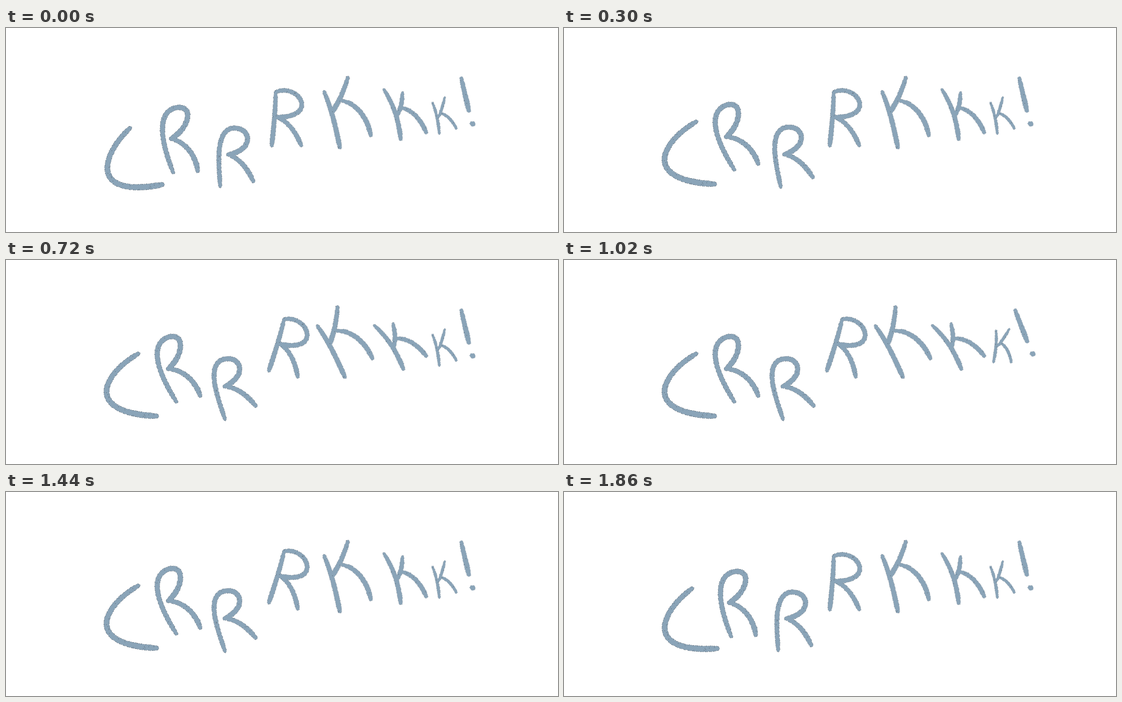
An HTML page with a canvas for the animation above (1.92 s loop, 1232 px wide and 455 px high).

```html
<!DOCTYPE html>
<html lang="en">
<head>
<meta charset="utf-8">
<title>Crrrkkk!</title>
<style>
html, body { margin: 0; width: 100%; height: 100%; overflow: hidden; background: #fff; }
canvas { display: block; }
</style>
</head>
<body>
<canvas id="stage" width="1232" height="455"></canvas>
<script>
const ctx = document.getElementById('stage').getContext('2d');
const INK = '#8aa4b8', EDGE = '#53606c';
const STEP = 60, STEPS = 32;
const letters = [];

let seed = 7;
const rand = () => {
  seed = (seed * 16807) % 2147483647;
  return seed / 2147483647;
};
const jitter = a => (rand() * 2 - 1) * a;

// Evenly spaced points along a centre line.
function sample(d) {
  const line = document.createElementNS('http://www.w3.org/2000/svg', 'path');
  line.setAttribute('d', d);
  const length = line.getTotalLength(), count = Math.ceil(length / 1.5);
  return Array.from({ length: count + 1 }, (_, i) => line.getPointAtLength(length * i / count));
}

// Rough brush outline: grows along the stroke, thins at both ends.
function brush(d, radius) {
  const pts = sample(d), last = pts.length - 1;
  const left = [], right = [], caps = [];
  pts.forEach(({ x, y }, i) => {
    const p = pts[Math.max(0, i - 1)], q = pts[Math.min(last, i + 1)];
    const dir = Math.atan2(q.y - p.y, q.x - p.x);
    const taper = last < 4 ? 1 : 0.74 + 0.26 * Math.min(1, Math.min(i, last - i) / 9);
    const r = radius * (0.9 + 0.18 * i / last) * taper;
    const edge = turn => {
      const w = r + jitter(0.6);
      return [x + Math.cos(dir + turn) * w, y + Math.sin(dir + turn) * w];
    };
    left.push(edge(-Math.PI / 2));
    right.unshift(edge(Math.PI / 2));
    if (i === 0 || i === last) {
      const from = i ? -Math.PI / 2 : Math.PI / 2;
      caps.push([1, 2, 3, 4, 5].map(k => edge(from + k * Math.PI / 6)));
    }
  });
  const path = new Path2D();
  [...left, ...caps[1], ...right, ...caps[0]].forEach(p => path.lineTo(...p));
  path.closePath();
  return { path, pts };
}

// Each letter tips about its own pivot; later letters are drawn cleaner.
function letter(x, y, degrees, radius, ...lines) {
  const i = letters.length;
  const strokes = lines.map(d => brush(d, radius));
  const pts = strokes.flatMap(s => s.pts);
  const specks = Array.from({ length: 18 - 2 * i }, () => {
    const p = pts[Math.floor(rand() * pts.length)];
    return [p.x + jitter(radius - 1), p.y + jitter(radius - 1)];
  });
  letters.push({ x, y, angle: degrees * Math.PI / 180, grit: 1 - i * 0.09, strokes, specks });
}

// C
letter(347, 295, 13.3, 5.7,
  'M277 223C208 288 190 380 349 349');
// R R R
letter(343, 281, -10.5, 5.2,
  'M373 322C355 277 325 185 384 177C420 175 408 225 368 247',
  'M368 247C400 253 424 285 428 319');
letter(491, 313, -14.8, 5,
  'M478 353C475 300 466 225 510 223C550 225 552 273 496 282',
  'M496 282C522 292 538 312 552 342');
letter(662, 225, 12.3, 4.8,
  'M602 143C601 180 599 210 593 262',
  'M602 143C652 121 702 199 604 199',
  'M604 199C630 207 648 235 659 262');
// K K k
letter(725, 213, -12.5, 5.1,
  'M710 142C722 170 733 205 745 266',
  'M763 110C757 132 745 162 728 188',
  'M752 163C778 167 806 196 814 239');
letter(866, 223, -15, 4.8,
  'M844 138C862 168 875 195 881 248',
  'M885 145C884 165 882 178 874 193',
  'M882 178C905 181 925 203 938 233');
letter(989, 203, 17, 3.2,
  'M952 167C960 187 965 208 967 235',
  'M979 155C975 173 971 188 965 199',
  'M969 190C984 193 995 205 1005 224');
// !
letter(1012, 178, -21, 5.4,
  'M1016 112L1033 184',
  'M1040 213l2 1');

// Two steps per letter: C to "!" tipping over, then "!" to C coming back.
function tilt(i, n) {
  const up = 2 * i + 1, down = STEPS - up;
  if (n < up || n > down) return 0;
  if (n === up) return 0.54;
  return n === down ? 0.52 - 0.02 * i : 1;
}

function drawLetter({ x, y, angle, grit, strokes, specks }, amount) {
  ctx.save();
  ctx.translate(x, y);
  ctx.rotate(angle * amount);
  ctx.translate(-x, -y);
  ctx.strokeStyle = EDGE;
  ctx.lineWidth = 1.4;
  ctx.setLineDash([5, 2, 2, 1]);
  ctx.globalAlpha = grit;
  strokes.forEach(s => ctx.stroke(s.path));
  ctx.globalAlpha = 1;
  ctx.fillStyle = INK;
  strokes.forEach(s => ctx.fill(s.path));
  ctx.fillStyle = EDGE;
  specks.forEach(([sx, sy]) => ctx.fillRect(sx, sy, 1.3, 1.3));
  ctx.restore();
}

const start = performance.now();
function frame() {
  const n = Math.floor((performance.now() - start) / STEP) % STEPS;
  ctx.fillStyle = '#fff';
  ctx.fillRect(0, 0, 1232, 455);
  letters.forEach((l, i) => drawLetter(l, tilt(i, n)));
  requestAnimationFrame(frame);
}
frame();
</script>
</body>
</html>
```
